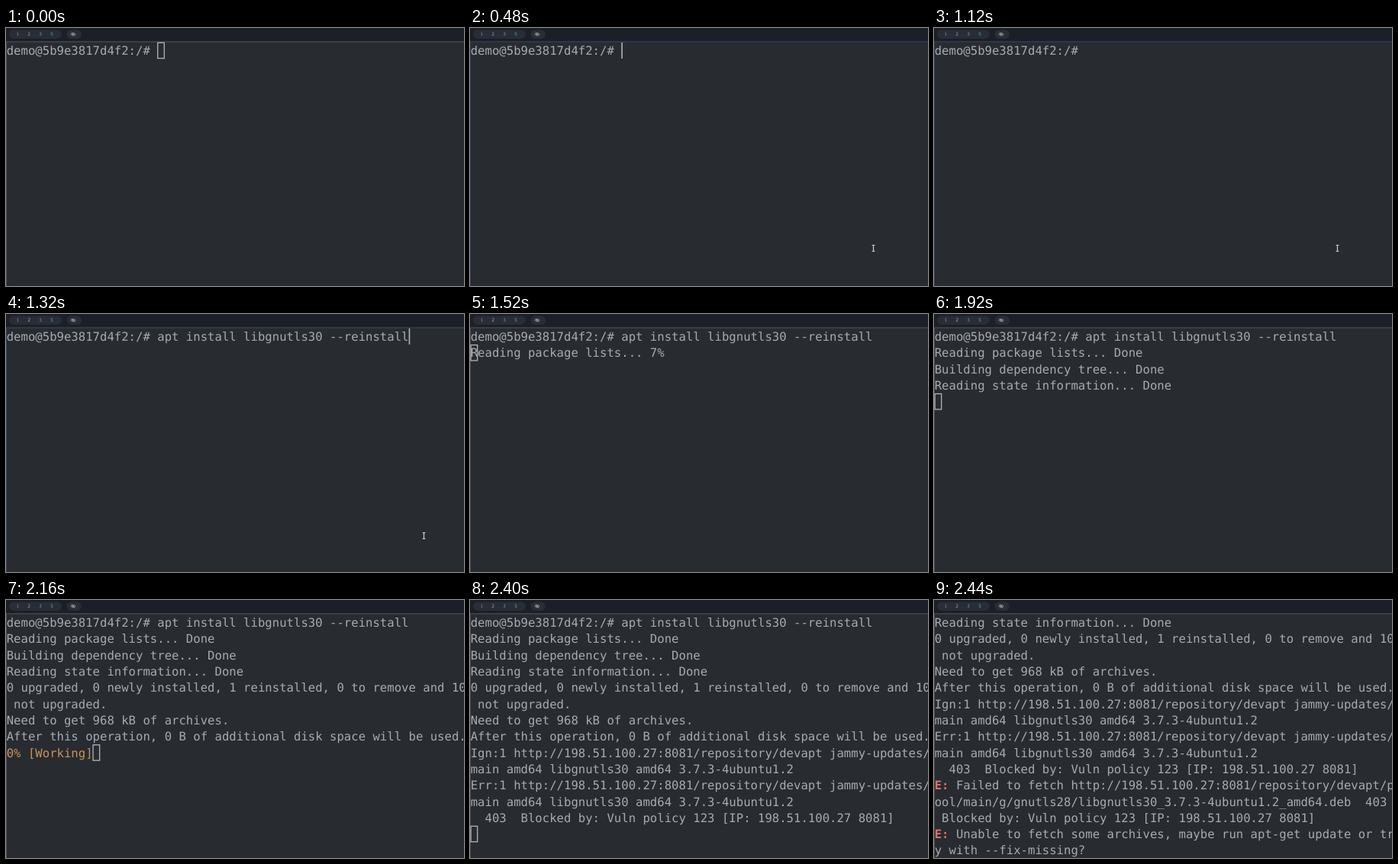
An HTML page that plays this animation: 600 by 338 pixels, repeating every 4.04 s.

```html
<!DOCTYPE html>
<html lang="en">
<head>
<meta charset="utf-8">
<title>Terminal</title>
<style>
html, body { margin: 0; width: 100%; height: 100%; overflow: hidden; background: #282b2f; }
svg { display: block; width: 100vw; height: 100vh; }
text { white-space: pre; text-rendering: geometricPrecision; }
#rows { font: 15.63px "DejaVu Sans Mono", "Noto Sans Mono", monospace; fill: #a6abb3; }
#bar text { font: 6.2px "Noto Sans Mono", monospace; text-anchor: middle; }
.err { fill: #d7706c; font-weight: bold; }
.busy { fill: #cb905f; }
</style>
</head>
<body>
<svg viewBox="0 0 600 338">
  <rect width="600" height="338" fill="#282b2f"/>
  <g id="bar">
    <rect width="600" height="17.5" fill="#1c1f28"/>
    <rect x="4" y="2.5" width="69" height="11.5" rx="5.75" fill="#292d35"/>
    <rect x="79.5" y="2.5" width="19.5" height="11.5" rx="5.75" fill="#292d35"/>
    <text x="15.3" y="10.4" fill="#858a92">1</text>
    <text x="30.2" y="10.4" fill="#a0a4aa">2</text>
    <text id="third" x="45" y="10.4">3</text>
    <text x="60" y="10.4" fill="#55a5dc">5</text>
    <g fill="none" stroke="#a4a8ae" stroke-width=".8">
      <path d="M84.8 8.2Q88 4.9 91.2 8.2Q88 11.5 84.8 8.2Z"/>
      <circle cx="88" cy="8.2" r=".8" fill="#a4a8ae"/>
      <path d="M85.6 6L90.4 10.4"/>
    </g>
  </g>
  <path id="edge" d="M600 18H.5V338" fill="none"/>
  <g id="rows"></g>
  <rect id="box" width="8.6" height="20.4" fill="none" stroke="#b0b5bc" stroke-width="1.3"/>
  <rect id="beam" width="1.6" height="21" fill="#b0b5bc"/>
  <path id="mouse" d="M-1.9 -4H-.6L0 -3.4L.6 -4H1.9M0 -3.4V3.4M-1.9 4H-.6L0 3.4L.6 4H1.9" fill="none" stroke="#d0d2d5" stroke-width="1.2"/>
</svg>
<script>
const LOOP = 4040, TICK = 40, CELL = 9.41, ROW = 21.31, LEFT = 0.7, TOP = 19;
const NS = "http://www.w3.org/2000/svg";
const $ = id => document.getElementById(id);

const prompt = "demo@5b9e3817d4f2:/# ";
const command = "apt install libgnutls30 --reinstall";
const ip = "198.51.100.27";
const repo = `http://${ip}:8081/repository/devapt`;
const pkg = "main amd64 libgnutls30 amd64 3.7.3-4ubuntu1.2";
const blocked = `Blocked by: Vuln policy 123 [IP: ${ip} 8081]`;
const busy = "0% [Working]";
const lists = "Reading package lists... ";
const tree = "Building dependency tree... ";
const state = "Reading state information... ";

const log = [
  prompt + command,
  lists + "Done",
  tree + "Done",
  state + "Done",
  "0 upgraded, 0 newly installed, 1 reinstalled, 0 to remove and 10",
  " not upgraded.",
  "Need to get 968 kB of archives.",
  "After this operation, 0 B of additional disk space will be used.",
  `Ign:1 ${repo} jammy-updates/`,
  pkg,
  `Err:1 ${repo} jammy-updates/`,
  pkg,
  "  403  " + blocked,
  `E: Failed to fetch ${repo}/p`,
  "ool/main/g/gnutls28/libgnutls30_3.7.3-4ubuntu1.2_amd64.deb  403 ",
  " " + blocked,
  "E: Unable to fetch some archives, maybe run apt-get update or tr",
  "y with --fix-missing?"
];

// [start ms, finished log lines, unfinished last line, cursor column]
const steps = [
  [0, 0, prompt, 21],
  [1160, 1, "", 0],
  [1400, 1, lists + "0%", 0],
  [1520, 1, lists + "7%", 0],
  [1720, 1, lists + "64%", 0],
  [1760, 2, "", 0],
  [1800, 2, tree + "50%", 0],
  [1840, 3, "", 0],
  [1880, 3, state + "0%", 0],
  [1920, 4, "", 0],
  [2000, 6, "", 0],
  [2040, 8, "", 0],
  [2120, 8, busy, 12],
  [2200, 8, "", 0],
  [2240, 10, "", 0],
  [2280, 10, busy, 12],
  [2320, 13, busy, 12],
  [2400, 13, "", 0],
  [2440, 18, "", 0]
];

const clamp = v => Math.max(0, Math.min(1, v));
const mix = (a, b, p) => `rgb(${a.map((v, i) => Math.round(v + (b[i] - v) * p))})`;
const show = (el, on) => el.setAttribute("visibility", on ? "visible" : "hidden");

const rows = Array.from({ length: 15 }, (_, i) => {
  const el = document.createElementNS(NS, "text");
  el.setAttribute("x", LEFT);
  el.setAttribute("y", TOP + 16.1 + i * ROW);
  return $("rows").appendChild(el);
});

function setRow(el, str) {
  if (el.dataset.str === str) return;
  el.dataset.str = str;
  el.textContent = "";
  const head = str.startsWith("E:") ? 2 : 0;
  if (head) {
    const mark = document.createElementNS(NS, "tspan");
    mark.setAttribute("class", "err");
    mark.textContent = str.slice(0, head);
    el.append(mark);
  }
  el.append(str.slice(head));
  el.setAttribute("class", str === busy ? "busy" : "");
}

function draw(ms) {
  const t = Math.floor(ms / TICK) * TICK;
  const [, done, tail, col] = steps.filter(s => s[0] <= t).pop();
  const lines = log.slice(0, done);
  if (tail) lines.push(tail);
  const scroll = Math.max(0, lines.length - rows.length);
  rows.forEach((el, i) => setRow(el, lines[i + scroll] || ""));

  const focus = clamp((t - 320) / 160) - clamp((t - 1280) / 240);
  $("edge").setAttribute("stroke", mix([82, 85, 91], [52, 73, 98], focus));
  $("third").setAttribute("fill", mix([83, 155, 200], [112, 148, 176], focus));

  const focused = t >= 360 && t < 1440;
  const typed = t >= 1160;
  show($("box"), !focused && t < 2440);
  $("box").setAttribute("x", LEFT + .4 + col * CELL);
  $("box").setAttribute("y", TOP + .3 + done * ROW);

  show($("beam"), focused && t !== 1120);
  const newline = t >= 1400;
  const beamCol = newline ? 0 : prompt.length + (typed ? command.length : 0);
  $("beam").setAttribute("x", LEFT + beamCol * CELL);
  $("beam").setAttribute("y", TOP + (newline ? ROW : 0));

  const away = 1 - clamp((t - 320) / 160) + clamp((t - 1280) / 160);
  show($("mouse"), t >= 360 && away < 1);
  $("mouse").setAttribute("transform", `translate(${528.5 + 76 * away} ${288.5 + 8 * away})`);
}

const start = performance.now();
function frame() {
  draw((performance.now() - start) % LOOP);
  requestAnimationFrame(frame);
}
frame();
</script>
</body>
</html>
```
